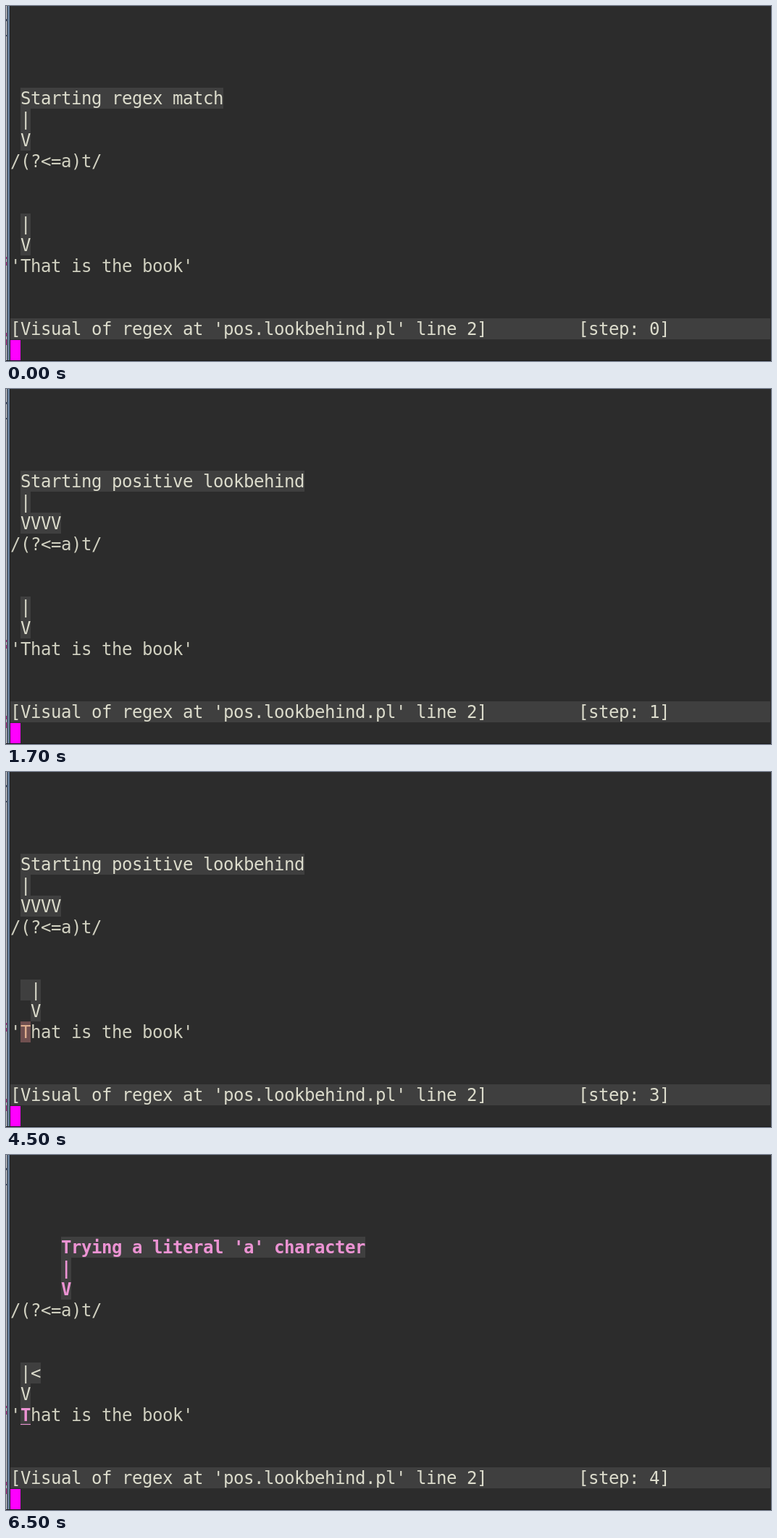
Recreate the animation shown at these times as an HTML page. Size 1056 by 491 pixels, loop 8000 ms.

```html
<!DOCTYPE html>
<html lang="en">
<head>
<meta charset="utf-8">
<title>Regex steps</title>
<style>
html, body { margin: 0; width: 100%; height: 100%; overflow: hidden; background: #2c2c2c; }
svg { display: block; width: 1056px; height: 491px; }
text { font: 24px "DejaVu Sans Mono", monospace; white-space: pre; }
.plain { fill: #d0d0c0; }
.marked { fill: #dcdccc; }
.pink { fill: #ec93d3; font-weight: bold; }
.passed { fill: #dfaf8f; }
</style>
</head>
<body>
<svg viewBox="0 0 1056 491">
  <rect width="1056" height="491" fill="#2c2c2c"/>
  <rect width="1" height="491" fill="#e4e4ec"/>
  <rect x="1" width="1" height="491" fill="#30343a"/>
  <rect x="2" width="3" height="491" fill="#667d98"/>
  <rect x="5" width="1" height="491" fill="#222"/>
  <g fill="#c43c98">
    <rect y="347" width="1" height="3"/><rect y="354" width="1" height="5"/>
    <rect y="452" width="1" height="5"/><rect y="461" width="1" height="8"/>
  </g>
  <g fill="#4a5878"><rect y="18" width="1" height="3"/><rect y="40" width="1" height="2"/></g>
  <rect x="6" y="432" width="1049" height="29" fill="#3f3f3f"/>
  <g id="screen"></g>
  <rect x="6" y="462" width="14" height="28" fill="#f0f"/>
  <rect y="490" width="1056" height="1" fill="#1a1a1a"/>
</svg>
<script>
const CELL = 14, LINE = 29, LEFT = 6, TOP = 113, ASCENT = 23, LOOP = 8000;
const screen = document.getElementById('screen');
const escapeText = s => s.replace(/&/g, '&amp;').replace(/</g, '&lt;');

// Places a string on the terminal grid, optionally with a background.
function put(row, col, text, style = 'plain', back = '') {
  const x = LEFT + col * CELL, y = TOP + row * LINE;
  const box = back && `<rect x="${x}" y="${y}" width="${text.length * CELL}" height="${LINE}" fill="${back}"/>`;
  const columns = [...text].map((_, i) => x + i * CELL).join(' ');
  return `${box}<text class="${style}" x="${columns}" y="${y + ASCENT}">${escapeText(text)}</text>`;
}
const mark = (row, col, text, style = 'marked') => put(row, col, text, style, '#3f3f3f');

const regexMatch = { col: 1, arrow: 'V' };
const lookbehind = { label: 'Starting positive lookbehind', col: 1, arrow: 'VVVV' };
const atFirst = { stem: '|', head: 1 };
const atSecond = { stem: ' |', head: 2, letter: 'passed' };
const steps = [
  { at: 0, label: 'Starting regex match', ...regexMatch, ...atFirst },
  { at: 500, ...lookbehind, ...atFirst },
  { at: 2500, label: 'Restarting regex match', ...regexMatch, ...atSecond },
  { at: 4500, ...lookbehind, ...atSecond },
  { at: 6500, label: "Trying a literal 'a' character", col: 5, arrow: 'V', style: 'pink',
    stem: '|<', head: 1, letter: 'pink' }
];

function firstLetter(style) {
  if (style === 'passed') return put(8, 1, 'T', style, '#705050');
  if (style === 'pink') return mark(8, 1, 'T', style) +
    '<rect x="20" y="372" width="14" height="1" fill="#ec93d3"/>';
  return put(8, 1, 'T');
}

function draw(index) {
  const s = steps[index];
  screen.innerHTML = [
    mark(0, s.col, s.label, s.style),
    mark(1, s.col, '|', s.style),
    mark(2, s.col, s.arrow, s.style),
    put(3, 0, '/(?<=a)t/'),
    mark(6, 1, s.stem),
    mark(7, s.head, 'V'),
    put(8, 0, "'"),
    firstLetter(s.letter),
    put(8, 2, "hat is the book'"),
    put(11, 0, "[Visual of regex at 'pos.lookbehind.pl' line 2]", 'marked'),
    put(11, 56, `[step: ${index}]`, 'marked')
  ].join('');
}

let shown = -1;
const start = performance.now();
function tick() {
  const t = (performance.now() - start) % LOOP;
  const index = steps.filter(s => s.at <= t).length - 1;
  if (index !== shown) draw(shown = index);
  requestAnimationFrame(tick);
}
tick();
</script>
</body>
</html>
```
